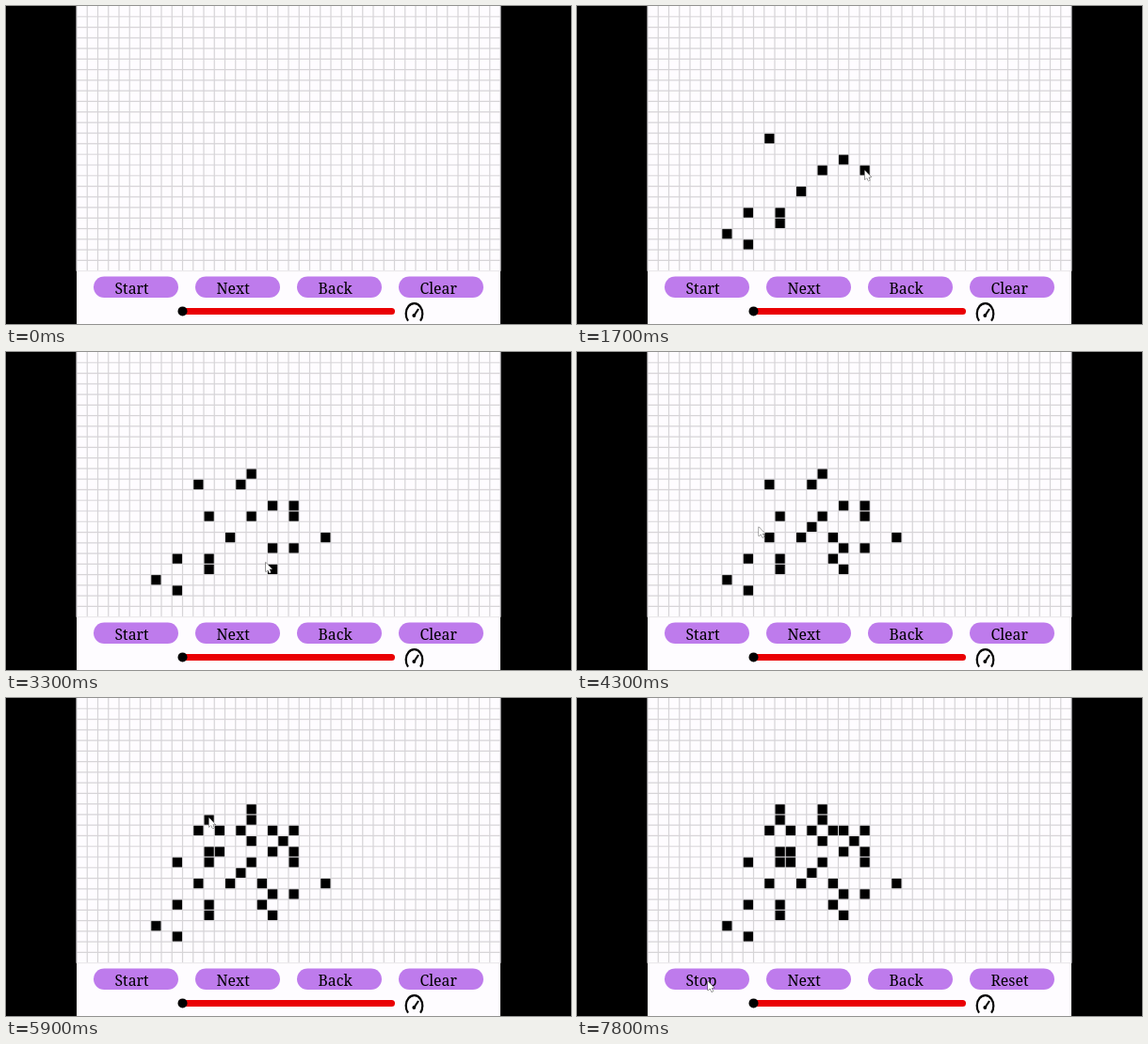
An HTML page with a canvas that plays this animation: 600x338 px, repeating every 8 s.

```html
<!DOCTYPE html>
<html>
<head>
<meta charset="utf-8">
<style>
html, body { margin: 0; width: 100%; height: 100%; overflow: hidden; background: #000; }
canvas { display: block; }
</style>
</head>
<body>
<canvas id="stage" width="600" height="338"></canvas>
<script>
const ctx = document.getElementById('stage').getContext('2d');
const W = 600, H = 338, LEFT = 75, RIGHT = 525;
const COLS = 40, ROWS = 25, CW = (RIGHT - LEFT) / COLS, CH = H / 30;
const LOOP = 8000, STEP = 100, TOGGLE = 7400;

// The hand clicks cells in bursts, each at a steady pace
const bursts = [
  { start: 300, every: 200, cells: [[12, 20], [12, 19], [9, 19], [9, 22]] },
  { start: 1200, every: 100, cells: [[7, 21], [11, 12], [14, 17], [16, 15], [18, 14], [20, 15], [20, 18], [18, 18]] },
  { start: 2400, every: 150, cells: [[12, 15], [15, 12], [16, 11], [20, 14], [23, 17], [18, 20]] },
  { start: 3400, every: 200, cells: [[17, 19], [17, 17], [15, 16], [11, 17]] },
  { start: 4600, every: 140, cells: [[9, 15], [12, 14], [13, 14], [16, 13], [19, 13], [20, 12], [18, 12], [16, 10], [13, 12], [12, 11]] },
  { start: 6000, every: 130, cells: [[12, 10], [17, 12], [13, 15]] }
];
const clicks = bursts.flatMap(({ start, every, cells }) => cells.map(([col, row], i) => ({
  time: start + i * every, col, row, x: LEFT + (col + 0.5) * CW, y: (row + 0.5) * CH
})));
const route = [{ time: 100, x: 250, y: 243 }, ...clicks, { time: 7200, x: 139, y: 301 }];
const arrow = new Path2D('M0 0V9.8L2.3 7.8L3.9 11.3L5.4 10.6L3.9 7.2H6.8Z');

function pointerAt(t) {
  const i = route.findIndex(p => p.time > t);
  if (i < 0) return route[route.length - 1];
  const a = route[i - 1], b = route[i];
  const u = (t - a.time) / (b.time - a.time), k = u * u * (3 - 2 * u);
  return { x: a.x + (b.x - a.x) * k, y: a.y + (b.y - a.y) * k };
}

function line(x1, y1, x2, y2) {
  ctx.beginPath();
  ctx.moveTo(x1, y1);
  ctx.lineTo(x2, y2);
  ctx.stroke();
}

function dot(x, y, r) {
  ctx.beginPath();
  ctx.arc(x, y, r, 0, 7);
  ctx.fill();
}

function pen(color, width, cap = 'butt') {
  ctx.strokeStyle = color;
  ctx.lineWidth = width;
  ctx.lineCap = cap;
}

function drawGrid() {
  ctx.fillStyle = '#fefcff';
  ctx.fillRect(LEFT, 0, RIGHT - LEFT, H);
  pen('#d6d4d7', 1.2);
  for (let i = 0; i <= COLS; i++) line(LEFT + i * CW, 0, LEFT + i * CW, ROWS * CH);
  for (let i = 1; i < ROWS; i++) line(LEFT, i * CH, RIGHT, i * CH);
  pen('#ebe9ec', 1.2);
  line(LEFT, ROWS * CH, RIGHT, ROWS * CH);
}

function drawButtons(running) {
  const labels = [running ? 'Stop' : 'Start', 'Next', 'Back', running ? 'Reset' : 'Clear'];
  ctx.font = '15.8px "Noto Serif", serif';
  labels.forEach((label, i) => {
    const x = 93 + i * 108;
    ctx.fillStyle = '#be7bec';
    ctx.beginPath();
    ctx.roundRect(x, 287.5, 90, 22.5, 11.25);
    ctx.fill();
    ctx.fillStyle = '#000';
    ctx.fillText(label, x + 22.5, 306);
  });
}

function drawSlider() {
  pen('#ea0004', 7, 'round');
  line(188, 324.4, 409.5, 324.4);
  ctx.fillStyle = '#000';
  dot(187.5, 324.4, 5);
}

function drawGauge() {
  pen('#000', 2.2);
  ctx.beginPath();
  ctx.ellipse(433.5, 327.2, 8.8, 11, 0, 2.4, 7.02);
  ctx.stroke();
  line(433, 329.5, 438, 322);
  dot(433.3, 329, 1.9);
}

function drawPointer({ x, y }) {
  ctx.save();
  ctx.translate(x, y);
  ctx.fillStyle = '#fff';
  pen('#444', 1);
  ctx.stroke(arrow);
  ctx.fill(arrow);
  ctx.restore();
}

function draw(t) {
  ctx.fillStyle = '#000';
  ctx.fillRect(0, 0, W, H);
  drawGrid();
  ctx.fillStyle = '#000';
  for (const c of clicks) {
    if (c.time <= t) ctx.fillRect(c.x - 5.1, c.y - 5.1, 10.2, 10.2);
  }
  drawButtons(t >= TOGGLE);
  drawSlider();
  drawGauge();
  if (t >= route[0].time) drawPointer(pointerAt(t));
}

let begin;
function frame(now) {
  begin ??= now;
  const t = (now - begin) % LOOP;
  draw(t - t % STEP);
  requestAnimationFrame(frame);
}
requestAnimationFrame(frame);
</script>
</body>
</html>
```
